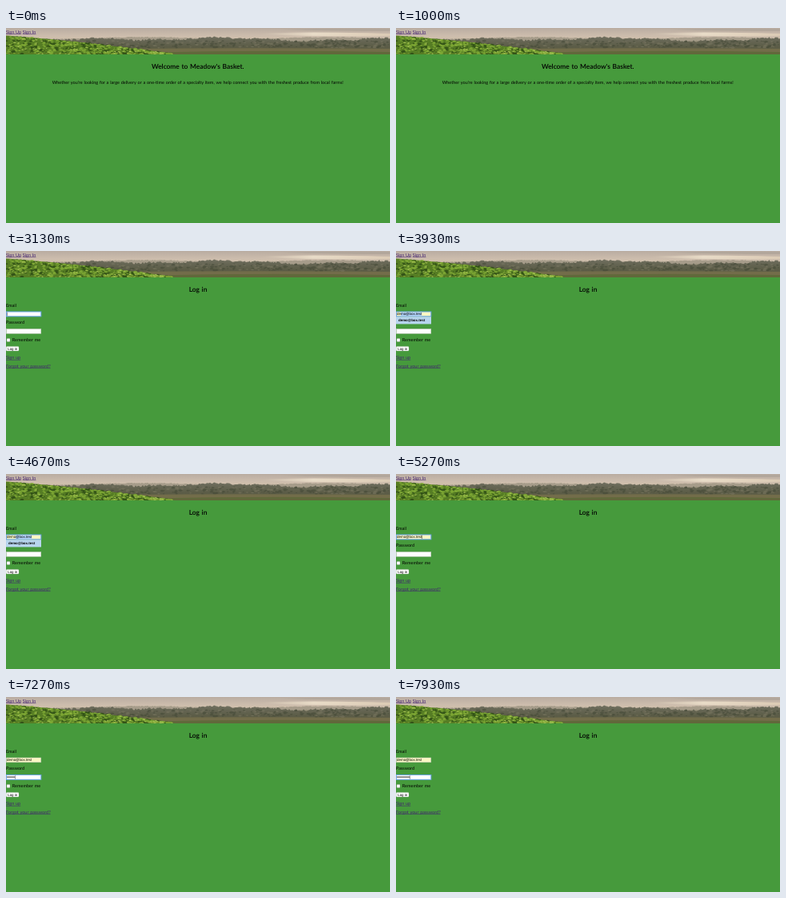
An HTML page that plays this animation: 480 by 244 pixels, repeating every 8 s.

```html
<!DOCTYPE html>
<html lang="en">
<head>
<meta charset="utf-8">
<title>Market sign in</title>
<style>
  html, body { margin: 0; height: 100%; overflow: hidden; background: #469a3c; }
  svg { display: block; width: 100vw; height: 100vh; }
  text { font: 5.5px Lato, sans-serif; word-spacing: .08em; text-rendering: geometricPrecision; white-space: pre; }
  .title { font-size: 8.4px; font-weight: 600; text-anchor: middle; }
  .centre { text-anchor: middle; }
  .link { fill: #402070; text-decoration: underline; }
  .control { font: 4.44px "Liberation Sans", Arial, sans-serif; word-spacing: 0; }
  .bold { font-weight: bold; }
  .dots { font-size: 5.7px; }
  .field { fill: #fff; stroke: #b9c4b6; stroke-width: .5; }
  .field.focused { stroke: #6da5ee; stroke-width: 1; }
  .field.filled { fill: #faf8c4; }
</style>
</head>
<body>
<svg viewBox="0 0 480 244" preserveAspectRatio="none">
  <defs>
    <linearGradient id="sky" x2="0" y2="1">
      <stop stop-color="#b9aca1"/><stop offset=".3" stop-color="#cdbdad"/><stop offset=".6" stop-color="#d3c1a7"/>
    </linearGradient>
    <linearGradient id="woods" x2="0" y2="1">
      <stop stop-color="#69695a"/><stop offset=".6" stop-color="#545640"/><stop offset="1" stop-color="#6b6845"/>
    </linearGradient>
    <linearGradient id="glow">
      <stop stop-color="#e6d8c2" stop-opacity="0"/><stop offset=".4" stop-color="#e8dbc7"/><stop offset="1" stop-color="#dccbb5"/>
    </linearGradient>
    <clipPath id="banner"><path d="M0 0H480V33H0Z"/></clipPath>
  </defs>
  <rect width="480" height="244" fill="#469a3c"/>
  <g id="landscape" clip-path="url(#banner)">
    <rect width="480" height="33" fill="url(#sky)"/>
    <path d="M320 7Q370 4 480 7V10Q390 11 320 8Z" fill="url(#glow)"/>
    <path d="M345 2Q410 0 480 1V4Q410 4 345 2Z" fill="#aaa097" opacity=".6"/>
  </g>
  <text class="link" y="6.5">Sign Up</text>
  <text class="link" x="20.8" y="6.5">Sign In</text>

  <g id="welcome">
    <text class="title" x="239.7" y="50.8">Welcome to Meadow's Basket.</text>
    <text class="centre" x="239.7" y="69.6">Whether you're looking for a large delivery or a one-time order of a specialty item, we help connect you with the freshest produce from local farms!</text>
  </g>

  <g id="login">
    <text class="title" x="240" y="50.8">Log in</text>
    <text y="69.8">Email</text>
    <rect id="emailField" class="field" x=".4" y="76" width="43.4" height="5.8"/>
    <rect id="selection" y="76.5" height="4.8" fill="#b0d2f7"/>
    <text id="email" class="control" x="1" y="80.4"></text>
    <text y="91.4">Password</text>
    <rect id="passwordField" class="field" x=".4" y="97.5" width="43.4" height="5.8"/>
    <text id="password" class="control dots" x="1" y="102.4"></text>
    <rect id="caret" width=".5" height="4.4" fill="#222"/>
    <rect x="1" y="109.4" width="4" height="4" rx=".7" fill="#fff" stroke="#9a9a9a" stroke-width=".4"/>
    <text x="7.8" y="113">Remember me</text>
    <rect x=".2" y="119.4" width="15.8" height="5.6" rx="1" fill="#fff" stroke="#bbb" stroke-width=".3"/>
    <text class="control" x="2.2" y="123.8">Log in</text>
    <text class="link" y="134.9">Sign up</text>
    <text class="link" y="145.5">Forgot your password?</text>
    <g id="suggestion">
      <rect y="82.2" width="44" height="9.2" fill="#b7d5ee"/>
      <text class="control bold" x="3" y="88.4">demo@box.test</text>
    </g>
  </g>
</svg>
<script>
const LOOP = 8000;
const ADDRESS = 'demo@box.test';
const LOGIN_AT = 2800, EMAIL_AT = 3650, ACCEPT_AT = 5050, PASSWORD_AT = 5450, DOTS_AT = 6300;
const KEY_MS = 215;

const $ = id => document.getElementById(id);
const show = (id, on) => $(id).setAttribute('visibility', on ? 'visible' : 'hidden');

let seed = 7;
const random = () => (seed = seed * 16807 % 2147483647) / 2147483647;

function addPath(d, fill, opacity = 1) {
  const path = document.createElementNS('http://www.w3.org/2000/svg', 'path');
  for (const [key, value] of Object.entries({ d, fill, opacity })) path.setAttribute(key, value);
  $('landscape').append(path);
}

function ridge(top, roughness, fill, opacity) {
  let d = 'M0 33';
  for (let x = 0; x <= 480; x += 1.5) d += `L${x} ${(top(x) + (random() - .5) * roughness).toFixed(1)}`;
  addPath(d + 'L480 33Z', fill, opacity);
}

function scatter(count, fill, place, size, opacity) {
  let d = '';
  for (let i = 0; i < count; i++) {
    const [x, y] = place();
    const w = size * (.5 + random()), h = w * .45;
    d += `M${x - w} ${y}Q${x} ${y - h * 2} ${x + w} ${y}Q${x} ${y + h * 2} ${x - w} ${y}`;
  }
  addPath(d, fill, opacity);
}

const cropEdge = x => 9.5 + x * .073 + x * x * .00018;

function drawLandscape() {
  ridge(x => 12.5 + Math.sin(x / 37) * 1.2, 1, '#99907f', .75);
  ridge(x => 14.5 + Math.sin(x / 11) * .9 + Math.sin(x / 29 + 1) * 1.3
    - 2.2 * Math.exp(-(((x - 235) / 50) ** 2)), 2.6, 'url(#woods)', .92);
  scatter(230, '#3f4432', () => [random() * 480, 16 + random() * 9], 2, .5);
  scatter(120, '#85806a', () => [random() * 480, 16 + random() * 9], 2, .4);
  addPath('M90 27Q260 24 480 26V33H90Z', '#77704b', .8);
  addPath('M170 31Q310 27 480 30V33H170Z', '#5d6738', .8);

  let crop = 'M0 33';
  for (let x = 0; x <= 215; x += 5) crop += `L${x} ${cropEdge(x)}`;
  addPath(crop + 'V33Z', '#567d24');
  const inCrop = () => {
    const x = random() * 208, top = cropEdge(x);
    return [x, top + random() * (33 - top)];
  };
  scatter(260, '#2b4915', inCrop, 2.1, .8);
  scatter(330, '#83ad37', inCrop, 1.9, .85);
  scatter(130, '#b0c85b', inCrop, 1.2, .8);
}

const keysTyped = (t, start, max) =>
  t < start ? 0 : Math.min(max, 1 + Math.floor((t - start) / KEY_MS));

function render(t) {
  const loggedIn = t >= LOGIN_AT;
  const typing = t >= EMAIL_AT && t < ACCEPT_AT;
  const onPassword = t >= PASSWORD_AT;
  const filled = t >= EMAIL_AT;
  const letters = keysTyped(t, EMAIL_AT, 4);
  const email = $('email'), password = $('password');

  $('welcome').style.display = loggedIn ? 'none' : '';
  $('login').style.display = loggedIn ? '' : 'none';
  if (!loggedIn) return;

  email.textContent = filled ? ADDRESS : '';
  password.textContent = '•'.repeat(keysTyped(t, DOTS_AT, 8));
  $('emailField').classList.toggle('filled', filled);
  $('emailField').classList.toggle('focused', !onPassword);
  $('passwordField').classList.toggle('focused', onPassword);
  show('suggestion', typing);
  show('selection', typing);
  if (typing) {
    const prefix = email.getSubStringLength(0, letters);
    $('selection').setAttribute('x', 1 + prefix);
    $('selection').setAttribute('width', email.getComputedTextLength() - prefix);
  }

  const active = onPassword ? password : email;
  const length = active.textContent ? active.getComputedTextLength() : 0;
  show('caret', !typing);
  $('caret').setAttribute('x', 1 + length);
  $('caret').setAttribute('y', onPassword ? 98.2 : 76.7);
}

drawLandscape();
const start = performance.now();
function frame() {
  render((performance.now() - start) % LOOP);
  requestAnimationFrame(frame);
}
frame();
</script>
</body>
</html>
```
